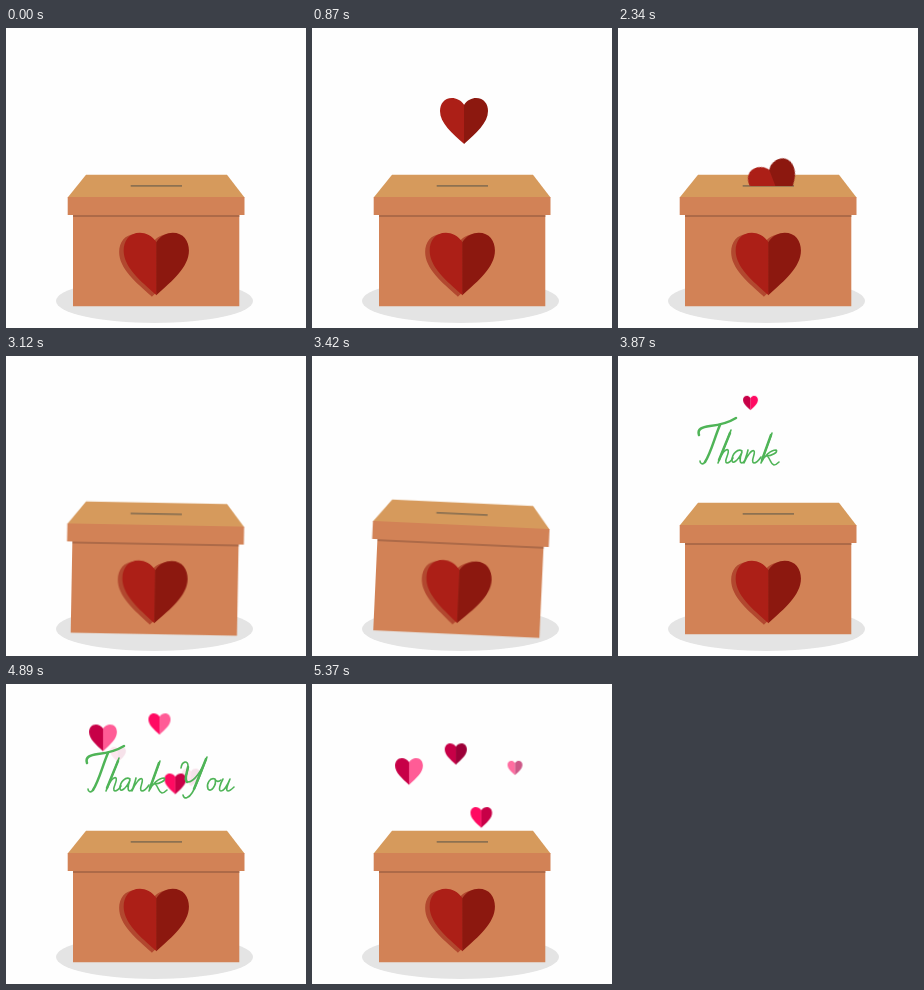
Animation of 300 by 300 pixels, one loop 5.4 s. Source, as an HTML page:

```html
<!DOCTYPE html>
<html lang="en">
<head>
<meta charset="utf-8">
<title>Thank You</title>
<style>
  html, body { margin: 0; width: 100%; height: 100%; overflow: hidden; background: #fefefe; }
  svg { position: absolute; inset: 0; width: 100vw; height: 100vh; }
  .box, .gift, .petal, .lettering { animation: 5400ms linear infinite; }

  .l { fill: var(--l, #ac1f17); }
  .r { fill: var(--r, #8c180f); }
  .shade { --l: #b2482f; --r: #b2482f; }

  .box { animation-name: shake; transform-origin: 150px 151px; }
  @keyframes shake {
    0%, 51.11% { transform: rotate(0deg); animation-timing-function: ease-in-out; }
    54.44% { transform: rotate(-3.4deg); animation-timing-function: ease-in-out; }
    60.93% { transform: rotate(5deg); animation-timing-function: ease-in-out; }
    65.93%, 100% { transform: rotate(0deg); }
  }

  .gift { animation-name: drop; }
  @keyframes drop {
    0%, 10.5% { transform: translate(152px, 93px) rotate(0deg) scale(0); animation-timing-function: ease-out; }
    16.11% { transform: translate(152px, 93px) rotate(0deg) scale(1); }
    26.11% { transform: translate(152px, 93px) rotate(0deg) scale(1); animation-timing-function: ease-in; }
    31.11% { transform: translate(154px, 115px) rotate(-8deg) scale(1); animation-timing-function: ease-out; }
    36.11% { transform: translate(153px, 148px) rotate(0deg) scale(1); animation-timing-function: ease-in-out; }
    43.33% { transform: translate(157px, 157px) rotate(-21deg) scale(1); animation-timing-function: ease-in-out; }
    47.22% { transform: translate(152px, 148px) rotate(0deg) scale(1); animation-timing-function: ease-in; }
    49.44%, 100% { transform: translate(152px, 186px) rotate(0deg) scale(1); }
  }

  .petal { animation-name: fall, var(--show); }
  @keyframes fall {
    from { transform: translate(var(--x), calc(var(--y) - 376px)) scale(var(--s)); }
    to { transform: translate(var(--x), calc(var(--y) + 2px)) scale(var(--s)); }
  }
  @keyframes first { 0%, 68.5% { opacity: 0 } 70.4%, 80.6% { opacity: 1 } 83.3%, 100% { opacity: 0 } }
  @keyframes second { 0%, 73% { opacity: 0 } 75%, 87% { opacity: 1 } 91.2%, 100% { opacity: 0 } }
  @keyframes third { 0%, 75.7% { opacity: 0 } 77.8%, 87% { opacity: 1 } 91.2%, 100% { opacity: 0 } }
  @keyframes fourth { 0%, 75.9% { opacity: 0 } 77.8%, 100% { opacity: 1 } }
  @keyframes fifth { 0%, 78.9% { opacity: 0 } 81.1%, 100% { opacity: 1 } }
  @keyframes sixth { 0%, 83.3% { opacity: 0 } 85.2%, 91.7% { opacity: 1 } 95%, 100% { opacity: 0 } }
  @keyframes seventh { 0%, 92.6% { opacity: 0 } 95.6%, 100% { opacity: 1 } }
  @keyframes eighth { 0%, 92.6% { opacity: 0 } 99.4%, 100% { opacity: .9 } }

  .lettering {
    animation-name: write, vanish;
    fill: none; stroke: #4fb457; stroke-width: 1.6; stroke-linecap: round; stroke-linejoin: round;
  }
  .lettering .bold { stroke-width: 2.5; }
  @keyframes write {
    0%, 66.11% { clip-path: inset(0 74.3% 0 0); }
    71.67% { clip-path: inset(0 45.5% 0 0); }
    77.22%, 100% { clip-path: inset(0 23% 0 0); }
  }
  @keyframes vanish {
    0%, 66.1% { opacity: 0; }
    66.11%, 93.33% { opacity: 1; }
    97.78%, 100% { opacity: 0; }
  }
</style>
</head>
<body>
<svg viewBox="0 0 300 300">
  <defs>
    <g id="heart">
      <path class="l" d="M.2-16C-3-21-8-23-12-23C-20-23-24-17-24-10C-24 2-12 12 .2 23Z"/>
      <path class="r" d="M0-16C3-21 8-23 12-23C20-23 24-17 24-10C24 2 12 12 0 23Z"/>
    </g>
    <clipPath id="aboveSlot"><path d="M0 0H300V158H0Z"/></clipPath>
  </defs>

  <ellipse cx="148.5" cy="273" rx="98.5" ry="22" fill="#e4e4e4"/>
  <g class="box">
    <path fill="#d28256" d="M67 186H233.3V278.3H67Z"/>
    <path fill="#ad6a48" d="M67 186H233.3V189H67Z"/>
    <path fill="#d69a5c" d="M80 146.7H221L238.5 169.5H61.7Z"/>
    <path fill="#d28256" d="M61.7 169H238.5V187H61.7Z"/>
    <path stroke="#8d7151" stroke-width="1.8" d="M124.7 157.9H176"/>
    <use class="shade" href="#heart" transform="translate(145.8 237.5) scale(1.36)"/>
    <use href="#heart" transform="translate(150.3 236) scale(1.36)"/>
  </g>

  <g clip-path="url(#aboveSlot)"><use class="gift" href="#heart"/></g>

  <use class="petal" href="#heart" style="--show:first; --x:132.5px; --y:152px; --s:.31; --l:#c70047; --r:#ff0a62"/>
  <use class="petal" href="#heart" style="--show:second; --x:185px; --y:127px; --s:.38; --l:#ff5c96; --r:#c7457a"/>
  <use class="petal" href="#heart" style="--show:third; --x:112px; --y:104px; --s:.33; --l:#ff5c96; --r:#c7457a"/>
  <use class="petal" href="#heart" style="--show:fourth; --x:169.3px; --y:133.5px; --s:.45; --l:#ff0a62; --r:#c70047"/>
  <use class="petal" href="#heart" style="--show:fifth; --x:97px; --y:87.5px; --s:.58; --l:#c70047; --r:#ff5c96"/>
  <use class="petal" href="#heart" style="--show:sixth; --x:153.5px; --y:73.6px; --s:.46; --l:#ff0a62; --r:#ff5c96"/>
  <use class="petal" href="#heart" style="--show:seventh; --x:143.8px; --y:70px; --s:.46; --l:#c70047; --r:#9c0038"/>
  <use class="petal" href="#heart" style="--show:eighth; --x:203px; --y:84px; --s:.31; --l:#ff5c96; --r:#c7457a"/>
</svg>

<svg class="lettering" viewBox="0 0 300 300" role="img" aria-label="Thank You">
  <!-- Thank -->
  <path class="bold" d="M81 79C79 73 84 71 92 70C101 69 110 67 118 62"/>
  <path class="bold" d="M102 69C97 80 93 97 87 106"/>
  <path d="M87 106C85 109 82 108 82 105"/>
  <path d="M113 74C109 85 104 97 100 107C103 98 108 92 110 94C112 97 105 106 109 107C111 107 113 105 115 102"/>
  <path d="M124 95C120 92 114 98 114 104C114 109 120 105 124 96C121 104 122 107 124 107C126 107 128 103 130 94C129 99 127 103 126 107C129 100 134 93 136 95C138 97 132 106 136 107C139 107 141 104 143 101"/>
  <path d="M154 77C150 88 146 98 143 107C146 100 153 94 158 94C161 96 153 100 149 100C152 101 152 108 156 109C158 109 160 107 161 106"/>
  <path class="bold" d="M112 77L101 104M153 79L144 104"/>
  <!-- You -->
  <path d="M175 84C176 77 182 76 182 82C182 89 177 96 181 98C188 99 196 86 201 73C196 86 191 101 186 109C183 114 178 116 177 111"/>
  <path class="bold" d="M182 83C181 89 178 95 181 98M200 75L188 105"/>
  <path d="M209 95C204 93 200 100 202 105C205 109 211 101 209 95C210 98 213 98 215 96"/>
  <path d="M217 95C214 100 212 107 215 107C218 107 222 100 224 95C222 100 219 107 222 107C224 107 226 105 228 103"/>
</svg>
</body>
</html>
```
